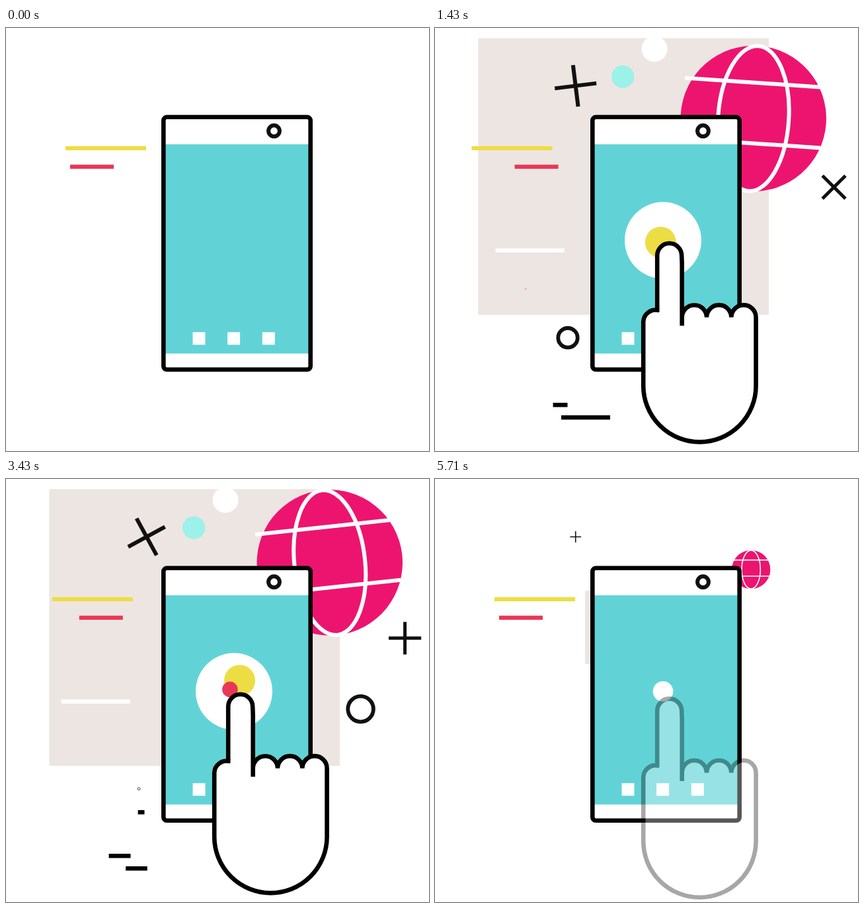
These frames come from a looping animation (640x640 px, 5780 ms). An HTML page:

```html
<!DOCTYPE html>
<html lang="en">
<head>
<meta charset="utf-8">
<title>Phone tap</title>
<style>
  html, body { margin: 0; width: 100%; height: 100%; overflow: hidden; background: #fff; }
  svg { display: block; width: 100vw; height: 100vh; }
</style>
</head>
<body>
<svg viewBox="0 0 640 640" fill="none">
  <g id="panel"><rect x="-219.8" y="-209.3" width="439.6" height="418.6" fill="#ede5e2"/></g>

  <g stroke-width="6.2">
    <path id="yellowLine" stroke="#eddd44"/>
    <path id="redLine" stroke="#e93857"/>
    <path id="whiteLine" stroke="#fff"/>
  </g>

  <g id="whiteDot"><circle r="19.5" fill="#fff"/></g>
  <g id="cyanDot"><circle r="17.2" fill="#9cf1e9"/></g>
  <g id="pinkDot"><circle r="40.7" fill="#ed146f"/></g>

  <g id="globe">
    <circle r="110.2" fill="#ed146f"/>
    <path d="M-107.5 -54.3H98M-107 37.5H104" stroke="#fff" stroke-width="6"/>
    <ellipse rx="53.5" ry="110" stroke="#fff" stroke-width="6"/>
  </g>

  <g stroke="#111">
    <g id="bigCross"><path d="M-31.7 0H31.7M0 -31.7V31.7" stroke-width="6"/></g>
    <g id="smallCross"><path d="M-24.6 0H24.6M0 -24.6V24.6" stroke-width="5"/></g>
    <g id="smallRing"><circle r="14.7" stroke-width="5.8"/></g>
    <g id="bigRing"><circle r="19.3" stroke-width="5.8"/></g>
  </g>

  <g stroke="#000" stroke-width="6.5">
    <path id="dashTop"/>
    <path id="dashMid"/>
    <path id="dashLow"/>
  </g>

  <rect x="238.3" y="134.8" width="222.4" height="382" rx="5" fill="#fff"/>
  <path d="M241 176H458V492.5H241Z" fill="#61d3d6"/>
  <rect x="238.3" y="134.8" width="222.4" height="382" rx="5" stroke="#000" stroke-width="6.6"/>
  <circle cx="405.5" cy="155.7" r="8.4" stroke="#111" stroke-width="6"/>
  <path d="M282.5 460.2h19v19h-19ZM335.1 460.2h19v19h-19ZM387.8 460.2h19v19h-19Z" fill="#fff"/>

  <g id="button"><circle r="58" fill="#fff"/></g>
  <g id="yellowDot"><circle r="23.5" fill="#eddd44"/></g>
  <g id="redDot"><circle r="11.8" fill="#e93857"/></g>

  <g id="hand">
    <path fill="#fff" stroke="#000" stroke-width="6.6" d="M336.2 430V344.3a18.5 18.5 0 0 1 37 0L373.7 357V450.5V437.8
      a18.65 18.65 0 0 1 37.3 0a18.65 18.65 0 0 1 37.3 0a18.65 18.65 0 0 1 37.3 0
      V541.2a85.2 85.2 0 0 1 -170.4 0V444.5A18.5 18.5 0 0 1 339 427.4"/>
  </g>
</svg>
<script>
const LOOP = 5780, FPS = 14, STEPS = 81;

const ease = (u, k = 2) => u ** k / (u ** k + (1 - u) ** k);

// Eased 0 to 1, starting at step `from`.
const ramp = (t, from, length = 8) => ease(Math.min(1, Math.max(0, (t - from) / length)));

// Eased 0 to 1 and later back to 0.
const pop = (t, on, off, rise = 8, fall = 8) => ramp(t, on, rise) - ramp(t, off, fall);

// Steep ease there and back, three times per loop.
const swing = t => ease(1 - Math.abs(1 - (t / 13.36) % 2), 2.3);

// Short press every 13 steps.
function tap(t) {
  const phase = (t - 28) % 13;
  return t < 28 || phase > 6 ? 0 : Math.sin(Math.PI * phase / 6) ** 2;
}

function place(id, x, y, scale = 1, angle = 0, opacity = 1) {
  const node = document.getElementById(id);
  node.setAttribute("transform", `translate(${x} ${y}) rotate(${angle}) scale(${scale})`);
  node.setAttribute("opacity", scale > 0 ? opacity : 0);
}

function line(id, y, x1, x2) {
  document.getElementById(id).setAttribute("d", x2 - x1 > 1 ? `M${x1} ${y}H${x2}` : "");
}

function orbit(id, cx, cy, r, degrees, scale) {
  const a = degrees * Math.PI / 180;
  place(id, cx + r * Math.cos(a), cy + r * Math.sin(a), scale);
}

function drawLines(t) {
  const s = swing(t);
  line("yellowLine", 181.8, 90 - 68 * s, 212 - 68 * s);
  line("redLine", 209.8, 97 + 46.5 * s, 163 + 46.5 * s);
  line("whiteLine", 336.6, 72.5 + 37.6 * s, 176.7 + 37.6 * s);

  line("dashTop", 504.2, 212 - 107 * ramp(t, 39.5, 32), 212 - 107 * ramp(t, 43.3, 35));
  line("dashMid", 570.3,
    201 - 25 * ramp(t, 3) + 6.5 * ramp(t, 12, 18) - 42 * ramp(t, 40, 14),
    200.5 - 60 * ramp(t, 43, 15));
  line("dashLow", 589.2,
    265 - 74 * ramp(t, 1) - 23 * ramp(t, 41.5, 14),
    265 - 97 * ramp(t, 40.8, 14));
}

function drawShapes(t) {
  place("panel", 285.2, 224.7, pop(t, 0, 75));
  place("whiteDot", 332, 31.8, pop(t, 3, 26) + pop(t, 38, 59));
  place("cyanDot", 284.2, 73.6, pop(t, 7.8, 65));
  place("pinkDot", 137.3, 395, pop(t, 19, 38) + pop(t, 51, 66));

  const globeX = 476.2 + 14.3 * pop(t, 12, 45, 18, 16) + 2 * ramp(t, 75, 5);
  const globeY = 137 - 10.5 * pop(t, 25.5, 62, 17, 18);
  const globeTurn = 5 * ramp(t, 7, 20) - 15 * ramp(t, 31, 27) + 10 * ramp(t, 61, 19);
  place("globe", globeX, globeY, pop(t, 3.5, 75), globeTurn);

  const bigTurn = -28.6 * Math.min(1, t / 48) ** 1.6 - 61.4 * ramp(t, 48, 12);
  const smallTurn = -90 * (ramp(t, 14, 12) + ramp(t, 35, 12) + ramp(t, 56, 17));
  place("bigCross", 212.7, 87.5, pop(t, 3, 75), bigTurn);
  place("smallCross", 603.6, 240.8, pop(t, 6.2, 67.5), smallTurn);

  place("smallRing", 201, 468.7, pop(t, 3, 20, 8, 39) + ramp(t, 62), 0, 1 - ramp(t, 74, 3.5));
  place("bigRing", 536.6, 348, 1 - ramp(t, 53, 9.5), 0, ramp(t, 30));
}

function drawPress(t) {
  place("button", 345, 321.3, pop(t, 2, 75));

  const angle = 90 - 360 * ramp(t, 27.6, 50);
  orbit("yellowDot", 341.4, 310.7, 13.5, angle, pop(t, 7.8, 65));
  orbit("redDot", 329.3, 307.3, 14.7, angle + 75, pop(t, 34, 65));

  const lift = 11 * (1 - ramp(t, 11, 9)) - 6.7 * tap(t) + 9 * ramp(t, 77, 4.8);
  place("hand", 0, lift, 1, 0, pop(t, 11.5, 77.5, 4, 4.3));
}

const start = performance.now();
function tick() {
  const ms = (performance.now() - start) % LOOP;
  const t = Math.floor((ms + 5) * FPS / 1000) % STEPS;
  drawLines(t);
  drawShapes(t);
  drawPress(t);
  requestAnimationFrame(tick);
}
tick();
</script>
</body>
</html>
```
